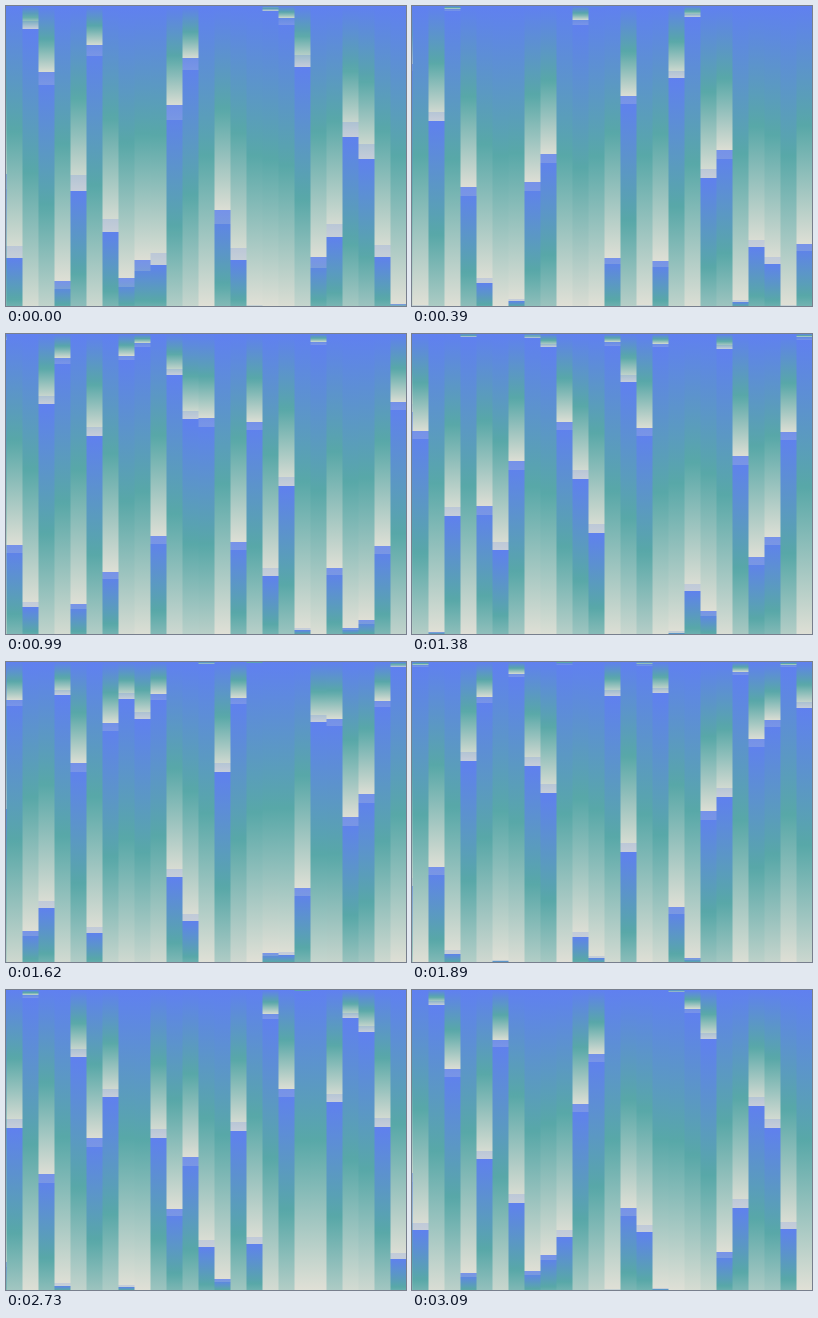
Recreate the animation shown at these times as an HTML page with a canvas. Size 400 by 300 pixels, loop 3120 ms.

```html
<!DOCTYPE html>
<html lang="en">
<head>
<meta charset="utf-8">
<title>Gradient columns</title>
<style>
html, body { margin: 0; width: 100%; height: 100%; overflow: hidden; background: #6080f0; }
canvas { display: block; }
</style>
</head>
<body>
<canvas id="stage" width="400" height="300"></canvas>
<script>
const stage = document.getElementById('stage').getContext('2d');
const echo = document.createElement('canvas').getContext('2d');
const W = 400, H = 300, BAR = 16, LAST = 24;
const STEP = 30, COUNT = 104;
const STOPS = [[96, 128, 240], [88, 168, 168], [224, 224, 214]];
echo.canvas.width = W;
echo.canvas.height = H;

function shade(v) {
  const i = v < 0.5 ? 0 : 1, f = v * 2 - i;
  return `rgb(${STOPS[i].map((c, k) => Math.round(c + (STOPS[i + 1][k] - c) * f))})`;
}

// Vertical ramp from v = 0 at the top to v = end at the bottom.
function ramp(ctx, x, top, bottom, end) {
  if (bottom - top < 0.01) return;
  const g = ctx.createLinearGradient(0, top, 0, bottom);
  g.addColorStop(0, shade(0));
  if (end > 0.5) g.addColorStop(0.5 / end, shade(0.5));
  g.addColorStop(1, shade(end));
  ctx.fillStyle = g;
  ctx.fillRect(x, top, BAR + 1, bottom - top);
}

function drawBars(ctx, n) {
  for (let i = -1; i <= LAST; i++) {
    const x = i * BAR + 0.5;
    const split = Math.round(H / 2 * (1 + Math.cos(0.06 * n + 0.1676 - (LAST - i) ** 3)));
    ramp(ctx, x, 0, split, 1);
    ramp(ctx, x, split, H, 1 - 0.5 * split / H);
  }
}

function draw(n) {
  stage.globalAlpha = 1;
  drawBars(stage, n);
  // Faint echo of the previous step
  drawBars(echo, (n + COUNT - 1) % COUNT);
  stage.globalAlpha = 0.2;
  stage.drawImage(echo.canvas, 0, 0);
}

function tick() {
  draw(Math.floor(performance.now() / STEP) % COUNT);
  requestAnimationFrame(tick);
}
tick();
</script>
</body>
</html>
```
